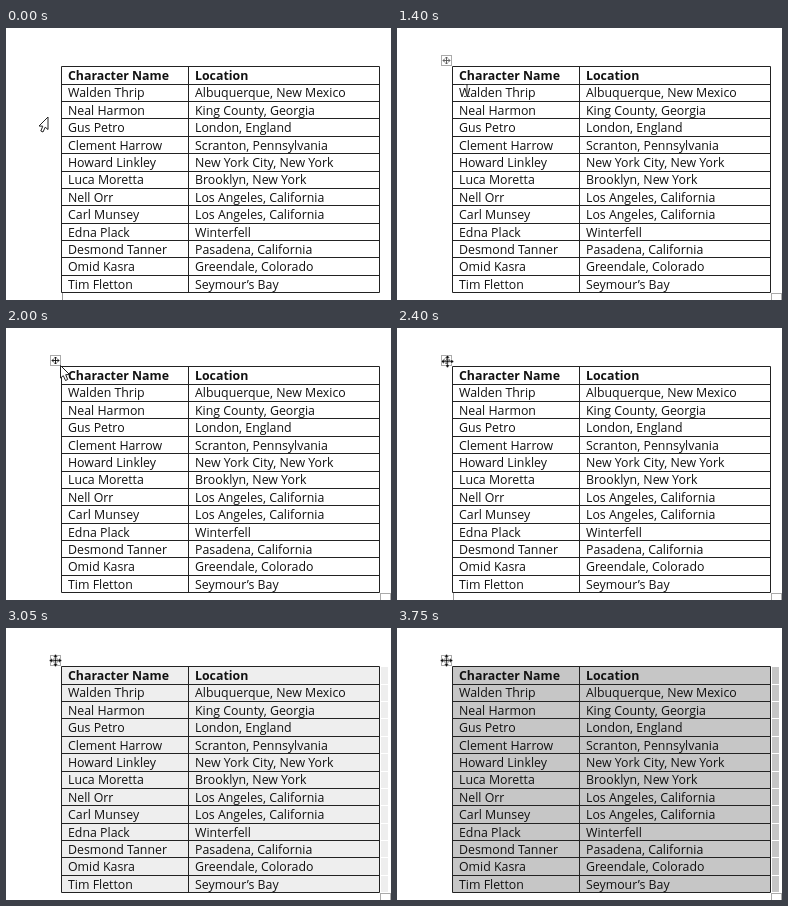
Recreate the animation shown at these times as an HTML page. Size 385x272 px, loop 4.8 s.

```html
<!DOCTYPE html>
<html lang="en">
<head>
<meta charset="utf-8">
<style>
html, body { margin: 0; width: 100%; height: 100%; overflow: hidden; background: #fff; }
svg { display: block; }
text { font: 500 12.35px "Open Sans", "Noto Sans", sans-serif; fill: #111; }
.head { font-weight: 700; }
</style>
</head>
<body>
<svg id="stage" width="385" height="272" viewBox="0 0 385 272">
  <g id="shade"></g>
  <g id="grid" fill="none" stroke="#222"></g>
  <g id="cells"></g>
  <path id="caret" d="M56.5 265V272" stroke="#999"/>
  <g id="handles">
    <rect x="44.5" y="27.5" width="10" height="10" fill="#fff" stroke="#aaa"/>
    <path id="cross" d="M49.5 29V36M46 32.5H53M48 30.5l1.5-1.5 1.5 1.5M48 34.5l1.5 1.5 1.5-1.5M47.5 31l-1.5 1.5 1.5 1.5M51.5 31l1.5 1.5-1.5 1.5" fill="none" stroke="#555" stroke-width=".9"/>
    <rect x="374.5" y="265.5" width="10" height="10" fill="#fff" stroke="#aaa"/>
  </g>
  <g id="pointer">
    <path id="margin" d="M0 0V12.5L-2.8 10.2-5 15-7.2 14-5.2 9.2-9 9Z" fill="#fff" stroke="#222"/>
    <path id="beam" d="M-3-6H-1L0-5 1-6H3M0-5V5M-3 6H-1L0 5 1 6H3" fill="none" stroke="#444"/>
    <path id="arrow" d="M0 0V12.5L2.8 10.2 5 15 7.2 14 5.2 9.2 9 9Z" fill="#fff" stroke="#222"/>
    <path id="move" d="M0-6.5L2.5-3.5H.7V-.7H3.5V-2.5L6.5 0 3.5 2.5V.7H.7V3.5H2.5L0 6.5-2.5 3.5H-.7V.7H-3.5V2.5L-6.5 0-3.5-2.5V-.7H-.7V-3.5H-2.5Z" fill="#111" stroke="#fff" stroke-width=".5"/>
  </g>
</svg>
<script>
const LOOP = 4800, TOP = 38.6, ROW = 17.4;
const LEFT = 55.5, MIDDLE = 182.5, RIGHT = 373.5;
const rows = [
  ["Character Name", "Location"],
  ["Walden Thrip", "Albuquerque, New Mexico"],
  ["Neal Harmon", "King County, Georgia"],
  ["Gus Petro", "London, England"],
  ["Clement Harrow", "Scranton, Pennsylvania"],
  ["Howard Linkley", "New York City, New York"],
  ["Luca Moretta", "Brooklyn, New York"],
  ["Nell Orr", "Los Angeles, California"],
  ["Carl Munsey", "Los Angeles, California"],
  ["Edna Plack", "Winterfell"],
  ["Desmond Tanner", "Pasadena, California"],
  ["Omid Kasra", "Greendale, Colorado"],
  ["Tim Fletton", "Seymour’s Bay"]
];
// Pointer stops: time, x, y
const stops = [
  [50, 42, 89], [500, 79, 70], [1000, 79, 70], [1400, 70, 62.5],
  [1500, 68, 59], [1550, 68, 59], [2000, 54.5, 37.5],
  [2150, 54.5, 37.5], [2500, 49.5, 32.5]
];

const $ = id => document.getElementById(id);
const show = (id, on) => $(id).setAttribute("visibility", on ? "visible" : "hidden");

function add(parent, tag, attrs, content = "") {
  const el = document.createElementNS("http://www.w3.org/2000/svg", tag);
  for (const key in attrs) el.setAttribute(key, attrs[key]);
  el.textContent = content;
  $(parent).append(el);
}

const lineY = i => Math.floor(TOP + i * ROW) + .5;

function build() {
  const top = lineY(0), bottom = lineY(rows.length);
  add("shade", "rect", { x: LEFT, y: top, width: RIGHT - LEFT, height: bottom - top });
  let lines = "";
  for (let i = 0; i <= rows.length; i++) lines += `M${LEFT} ${lineY(i)}H${RIGHT}`;
  for (const x of [LEFT, MIDDLE, RIGHT]) lines += `M${x} ${top}V${bottom}`;
  add("grid", "path", { d: lines });
  rows.forEach((row, i) => {
    add("shade", "rect", { x: 375, y: lineY(i) + .5, width: 7, height: lineY(i + 1) - lineY(i) - 1 });
    row.forEach((label, col) => add("cells", "text", {
      x: col ? 189 : 62, y: Math.round(52 + i * ROW), class: i ? "" : "head"
    }, label));
  });
}

function pointerAt(t) {
  let [, x, y] = stops[0];
  for (let i = 1; i < stops.length; i++) {
    const [t0, x0, y0] = stops[i - 1], [t1, x1, y1] = stops[i];
    const p = Math.min(1, Math.max(0, (t - t0) / (t1 - t0)));
    const e = p * p * (3 - 2 * p);
    x += (x1 - x0) * e;
    y += (y1 - y0) * e;
  }
  return [x, y];
}

function draw(t) {
  const [x, y] = pointerAt(t);
  const kind = t < 250 ? "margin" : t < 1800 ? "beam" : t < 2300 ? "arrow" : "move";
  for (const id of ["margin", "beam", "arrow", "move"]) show(id, id === kind);
  $("pointer").setAttribute("transform", `translate(${x} ${y})`);
  show("handles", t >= 300);
  $("cross").setAttribute("stroke", t < 1900 ? "#555" : "#111");
  show("caret", t < 600 || t < 2700 && (t + 100) % 700 >= 400);
  show("shade", t >= 3050);
  $("shade").setAttribute("fill", t < 3150 ? "#eee" : "#c6c6c6");
}

build();
const start = performance.now();
function tick() {
  draw((performance.now() - start) % LOOP);
  requestAnimationFrame(tick);
}
tick();
</script>
</body>
</html>
```
